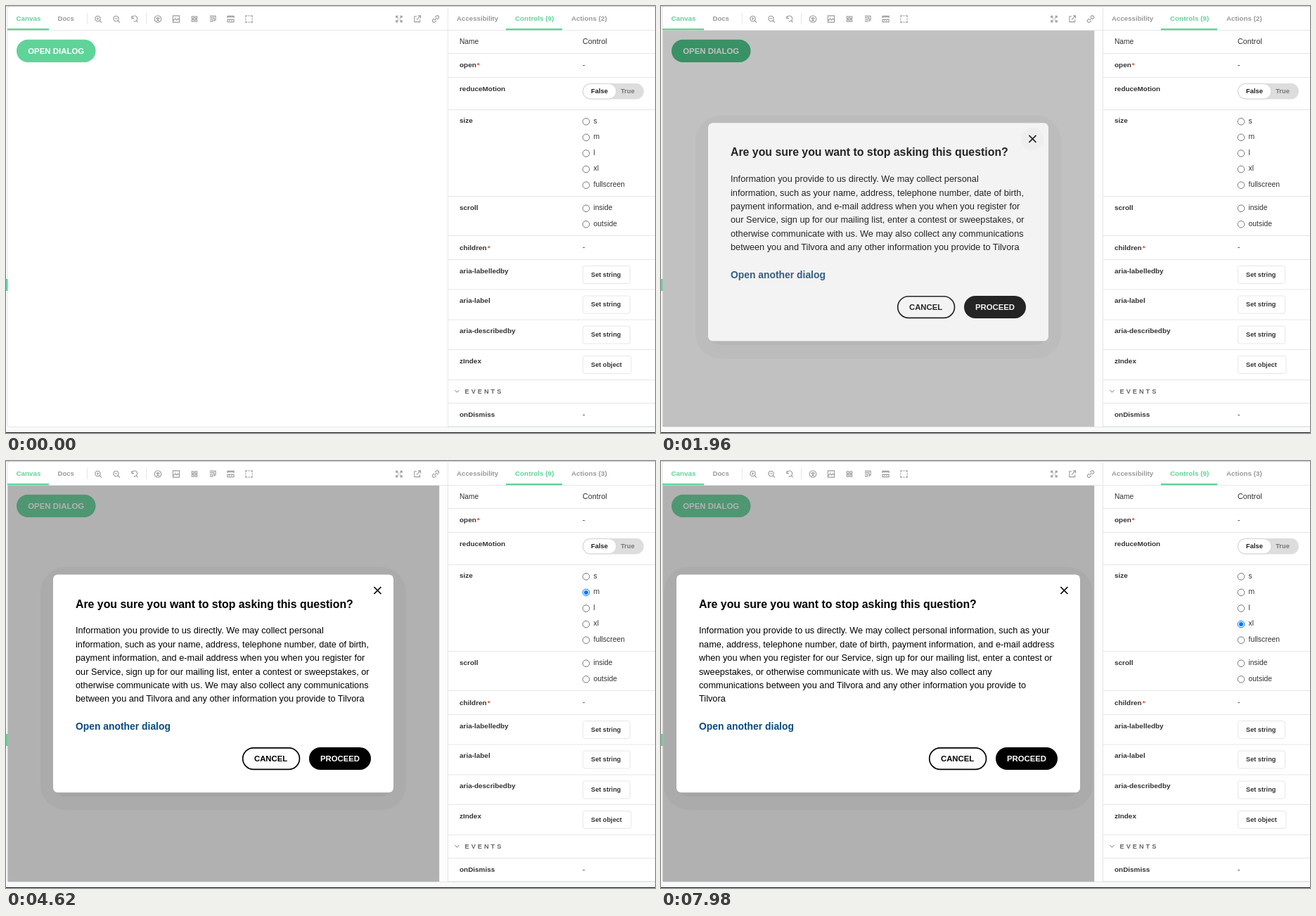
Write an HTML page that moves like this. It is 923 by 607 pixels and loops after 8 s.

```html
<!DOCTYPE html>
<html lang="en">
<head>
<meta charset="utf-8">
<title>Dialog sizes</title>
<style>
  html, body { margin: 0; width: 100%; height: 100%; overflow: hidden; background: #f8fafc; }
  svg { display: block; width: 100vw; height: 100vh; font-family: "Liberation Sans", Arial, sans-serif; }
  .icon { fill: none; stroke: #999; stroke-width: 1.2; }
</style>
</head>
<body>
<svg id="stage" viewBox="0 0 923 607"></svg>
<script>
const GREEN = '#60d399', LINE = '#e6e6e6', INK = '#333';
const LOOP = 8000, TICK = 70;

const text = (x, y, string, size, color = INK, weight = 700, extra = '') =>
  `<text x="${x}" y="${y}" font-size="${size}" font-weight="${weight}" fill="${color}" ${extra}>${string}</text>`;
const rect = (x, y, w, h, fill, r = 0, extra = '') =>
  `<rect x="${x}" y="${y}" width="${w}" height="${h}" fill="${fill}" rx="${r}" ${extra}/>`;
const icon = (x, y, d) => `<path class="icon" transform="translate(${x} ${y}) scale(.92)" d="${d}"/>`;
const ring = r => `M${-r} 0a${r} ${r} 0 1 0 ${2 * r} 0a${r} ${r} 0 1 0 ${-2 * r} 0`;
const middle = 'text-anchor="middle"';

function toolbar() {
  const lens = ring(4) + 'M3 3L6 6';
  const squares = [[-4, -4], [1, -4], [-4, 1], [1, 1]].map(([x, y]) => `M${x} ${y}h3v3h-3z`).join('');
  return text(14.5, 21, 'Canvas', 9.85, GREEN) + text(73.5, 21, 'Docs', 9.6, '#999')
    + rect(2, 32, 59, 2.4, GREEN)
    + rect(115, 10, 1, 16, LINE) + rect(199, 10, 1, 16, LINE)
    + icon(130.5, 18, lens + 'M-2 0h4M0 -2v4')
    + icon(156.5, 18, lens + 'M-2 0h4')
    + icon(183, 18.5, 'M-4.5 -4.5v3.5h3.5M-4.5 -1.5a4.3 4.3 0 1 1 3 5M2 2l3 3')
    + icon(216, 18.5, ring(5.2) + 'M-3 -1.2h6M0 -3.3v4.3M0 .5l-1.8 3M0 .5l1.8 3')
    + icon(242, 18.5, 'M-5 -5h10v10h-10zM-5 3l3.5-3.5l2 2l2-2l2.5 2.5M-2 -2.5h1')
    + icon(268, 18.5, squares)
    + icon(294, 18.5, 'M-4.5 -4.5h9v6h-2M-4.5 -2h6.5v6M-4.5 .5h4v4M-4.5 3h2v2')
    + icon(319.5, 18.5, 'M-5 -1.5v-3h10v3M-5 -3h10M-5 1h10v3.5h-10zM-2 1v2M1.5 1v2')
    + icon(345.5, 18.5, 'M-5 -2.5v-2.5h2.5M2.5 -5h2.5v2.5M5 2.5v2.5h-2.5M-2.5 5h-2.5v-2.5M-1 -5h2M-1 5h2M-5 -1v2M5 -1v2')
    + icon(559, 18.5, 'M-4.5 -1.5v-3h3M1.5 -4.5h3v3M4.5 1.5v3h-3M-1.5 4.5h-3v-3M-4.5 -4.5l3.5 3.5M4.5 -4.5l-3.5 3.5M4.5 4.5l-3.5-3.5M-4.5 4.5l3.5-3.5')
    + icon(585, 18.5, 'M-1 -4h-3.5v8.5h8.5v-3.5M1 -5h4v4M5 -5l-6 6')
    + icon(611, 18.5, 'M-1 -2.5l2-2a2.2 2.2 0 0 1 3.3 3.3l-2 2M1 2.5l-2 2a2.2 2.2 0 0 1-3.3-3.3l2-2M-2 2l4-4');
}

const radio = (id, label, y) => `<g id="${id}"><circle cx="825" cy="${y}" r="4.8" fill="#fff" stroke="#767676"/>
  <circle cx="825" cy="${y}" r="3" fill="none"/></g>` + text(835.5, y + 2.3, label, 10.4, INK, 400);
const setter = (y, label, w) => rect(820.5, y, w, 25, '#fff', 3, `stroke="${LINE}"`)
  + text(832, y + 15.2, label, 9.2);

function controlsPanel() {
  const rowLines = [67, 101, 147, 270, 326, 360, 402.5, 445.5, 488, 531, 564, 597];
  const names = [['reduceMotion', 120.5], ['size', 166], ['scroll', 290], ['aria-labelledby', 379.5],
    ['aria-label', 422], ['aria-describedby', 465], ['zIndex', 508], ['onDismiss', 584]];
  const required = (name, y) => text(645, y, `${name}<tspan dx="1" fill="#f5421a">*</tspan>`, 9.95);
  return rect(628, 2, 1, 596, LINE)
    + text(641, 21, 'Accessibility', 9.7, '#999') + text(724, 21, 'Controls (9)', 9.85, GREEN)
    + text(804, 21, 'Actions (2)', 9.85, '#999', 700, 'id="actions"')
    + rect(711, 32, 80, 2.4, GREEN)
    + rowLines.map(y => rect(629, y, 294, 1, LINE)).join('')
    + text(645, 53.5, 'Name', 10.2, INK, 400) + text(820, 53.5, 'Control', 10.8, INK, 400)
    + required('open', 87) + required('children', 346.5)
    + names.map(([name, y]) => text(645, y, name, 9.95)).join('')
    + [87, 346, 584].map(y => text(820, y, '-', 10.5, INK, 400)).join('')
    + rect(820, 110, 87, 22.5, '#ddd', 11.2)
    + rect(820.5, 110.5, 47.5, 21.5, '#fff', 10.7, 'stroke="#d2d2d2"')
    + text(844, 124, 'False', 9.4, '#222', 700, middle) + text(884, 124, 'True', 9.3, '#777', 700, middle)
    + radio('s', 's', 164.3) + radio('m', 'm', 186.9) + radio('l', 'l', 209.5)
    + radio('xl', 'xl', 232.1) + radio('full', 'fullscreen', 254.7)
    + radio('inside', 'inside', 287.7) + radio('outside', 'outside', 310.3)
    + setter(369.5, 'Set string', 67) + setter(412, 'Set string', 67)
    + setter(455, 'Set string', 67) + setter(497.5, 'Set object', 68.5)
    + icon(641.5, 547.5, 'M-3.2 -1.6L0 1.7L3.2 -1.6')
    + text(652.5, 551, 'EVENTS', 9.2, '#666', 700, 'letter-spacing="3"');
}

const bodyLines = {
  medium: ['Information you provide to us directly. We may collect personal',
    'information, such as your name, address, telephone number, date of birth,',
    'payment information, and e-mail address when you when you register for',
    'our Service, sign up for our mailing list, enter a contest or sweepstakes, or',
    'otherwise communicate with us. We may also collect any communications',
    'between you and Tilvora and any other information you provide to Tilvora'],
  large: ['Information you provide to us directly. We may collect personal information, such as your',
    'name, address, telephone number, date of birth, payment information, and e-mail address',
    'when you when you register for our Service, sign up for our mailing list, enter a contest or',
    'sweepstakes, or otherwise communicate with us. We may also collect any',
    'communications between you and Tilvora and any other information you provide to',
    'Tilvora'],
};

function dialog(id, left, width) {
  const x = left + 32, right = left + width;
  const lines = bodyLines[id].map((line, i) => text(x, 245.3 + i * 19.4, line, 12.74, '#000', 400));
  return `<g id="${id}">`
    + rect(left - 18, 150.5, width + 36, 346, '#000', 36, 'opacity=".03"')
    + rect(left + 3, 172, width - 6, 305, '#000', 14, 'opacity=".04"')
    + rect(left, 161.4, width, 309.8, '#fff', 6.5)
    + (id === 'medium' ? `<circle id="focus" cx="${right - 22.6}" cy="184" r="16" fill="#edeef1"/>` : '')
    + `<path d="M${right - 27.6} 179l10 10m0 -10l-10 10" stroke="#000" stroke-width="1.7"/>`
    + text(x, 208.5, 'Are you sure you want to stop asking this question?', 15.87, '#000')
    + lines.join('')
    + text(x, 382, 'Open another dialog', 13.88, '#0b4a80')
    + rect(right - 214.3, 407.8, 80.8, 30.6, '#fff', 15.3, 'stroke="#000" stroke-width="1.7"')
    + text(right - 174.4, 427, 'CANCEL', 11.35, '#000', 700, middle)
    + rect(right - 120, 407, 88, 32, '#000', 16)
    + text(right - 76, 427, 'PROCEED', 11.35, '#fff', 700, middle) + '</g>';
}

const $ = id => document.getElementById(id);
$('stage').innerHTML = rect(0, 0, 923, 607, '#f8fafc') + rect(2, 0.5, 940, 598, '#fff', 4, `stroke="${LINE}"`)
  + rect(0, 0, 923, 1, '#c8c8c8') + rect(0, 606, 923, 1, '#161616')
  + rect(0, 388, 2.5, 17, GREEN) + rect(2, 34, 921, 1, LINE)
  + toolbar() + controlsPanel()
  + rect(15, 47.7, 112.5, 32.3, GREEN, 16.1, 'id="opener"')
  + text(71.2, 67.6, 'OPEN DIALOG', 11.43, '#fff', 700, middle)
  + `<g id="gutter">${rect(616, 35, 12, 563, '#fdfdfd')}${rect(616, 35, 1, 563, '#ececec')}</g>`
  + rect(2.5, 35, 613.5, 563, '#343434', 0, 'id="overlay"')
  + `<g id="dialogs">${dialog('medium', 67, 484)}${dialog('large', 22, 574)}</g>`;

const clamp = v => Math.min(1, Math.max(0, v));
const within = (t, [from, to]) => t >= from && t < to;
const show = (id, on) => $(id).setAttribute('visibility', on ? 'inherit' : 'hidden');
const mix = (a, b, p) => `rgb(${a.map((v, i) => Math.round(v + (b[i] - v) * p))})`;

const radios = {
  s: { hover: [2870, 3640], checked: [0, 0] },
  m: { hover: [3920, 4550], checked: [4060, 5110] },
  l: { hover: [4970, 5670], checked: [5110, 6720] },
  xl: { hover: [5810, 7280], checked: [6720, LOOP], pressed: [6580, 6720] },
};

function drawRadio(id, t) {
  const { hover, checked, pressed = [0, 0] } = radios[id];
  const [outer, dot] = $(id).children;
  const isChecked = within(t, checked), isHover = within(t, hover);
  const color = isChecked ? (isHover ? '#005cc8' : '#0075ff')
    : within(t, pressed) ? '#8d8d8d' : isHover ? '#4f4f4f' : '#767676';
  outer.setAttribute('stroke', color);
  dot.setAttribute('fill', isChecked ? color : 'none');
}

function draw(now) {
  // The picture advances in steps of one tick.
  const t = Math.floor(now % LOOP / TICK) * TICK;
  const hover = clamp((t - 1050) / 280) - clamp((t - 1890) / 280);
  const opened = 1 - (1 - clamp((t - 1890) / 165)) ** 3;
  const isLarge = t >= 5110;

  $('opener').setAttribute('fill', mix([96, 211, 153], [46, 178, 113], hover));
  show('gutter', t >= 1890);
  $('overlay').setAttribute('opacity', 0.38 * opened);
  $('dialogs').setAttribute('opacity', opened);
  $('dialogs').setAttribute('transform', `translate(0 ${26 * (1 - opened)})`);
  show('medium', !isLarge);
  show('large', isLarge);
  show('focus', t < 4060 && !isLarge);
  $('focus').setAttribute('opacity', clamp((t - 1890) / 210));
  $('actions').textContent = `Actions (${t < 2170 ? 2 : 3})`;
  Object.keys(radios).forEach(id => drawRadio(id, t));
}

const start = performance.now();
function frame() {
  draw(performance.now() - start);
  requestAnimationFrame(frame);
}
frame();
</script>
</body>
</html>
```
